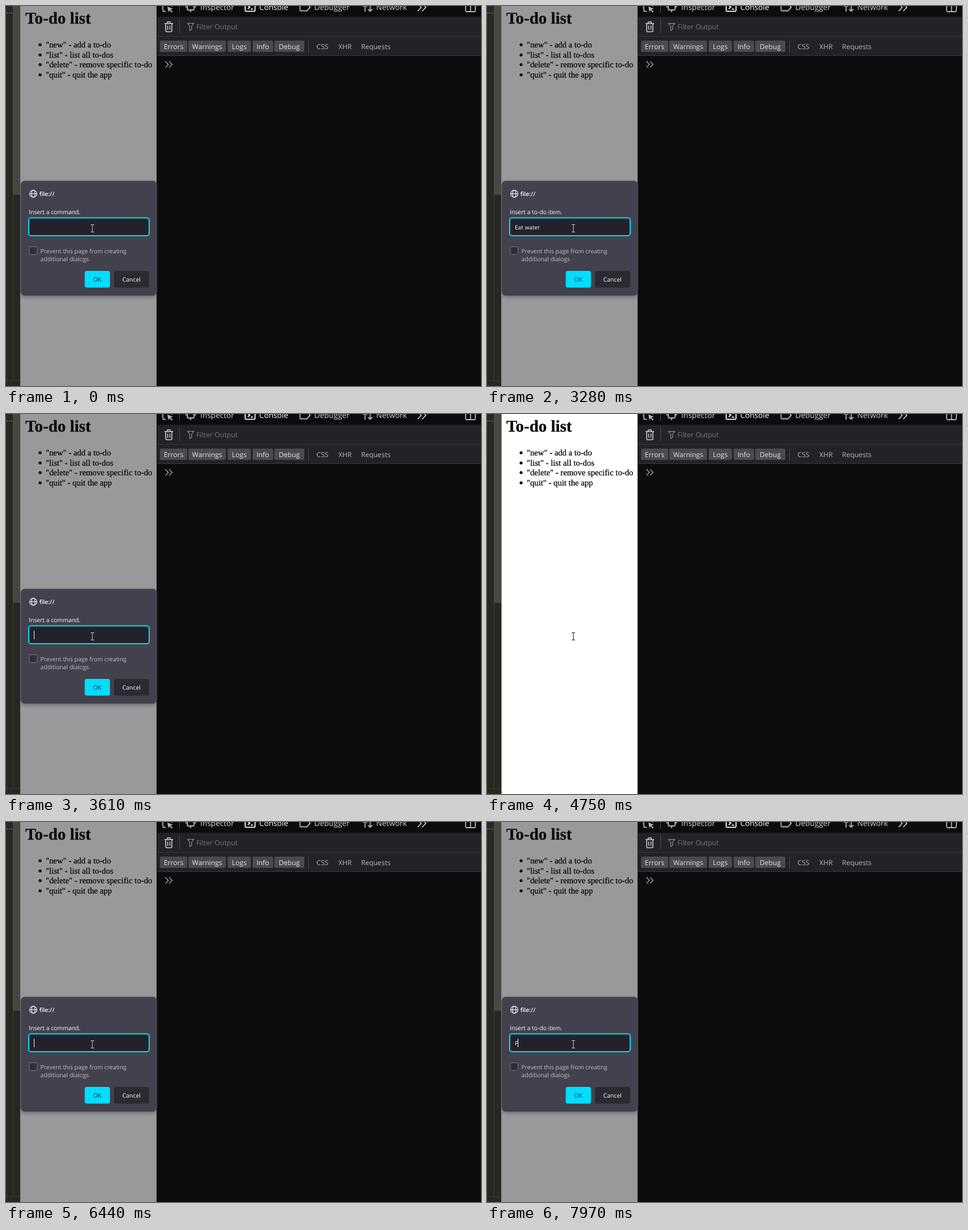
Recreate the animation shown at these times as an HTML page. Size 836 by 670 pixels, loop 8000 ms.

```html
<!DOCTYPE html>
<html lang="en">
<head>
<meta charset="utf-8">
<title>To-do list</title>
<style>
  html, body { margin: 0; width: 100%; height: 100%; overflow: hidden; background: #0c0c0d; }
  svg { display: block; width: 100vw; height: 100vh; }
  text { text-rendering: geometricPrecision; white-space: pre; }
  .ui { font-family: "Open Sans", "Noto Sans", sans-serif; font-size: 12.1px; fill: #b8b8bc; }
  .tabs { font-size: 13.6px; fill: #d0d0d3; }
  .page { font-family: "Liberation Serif", "Times New Roman", serif; font-size: 14.7px; fill: #000; }
  .page text { stroke: #000; stroke-width: .25; }
  .page .title { font-size: 28.9px; font-weight: 700; }
  .dialog { font-size: 10.4px; fill: #fbfbfe; }
  .mid { text-anchor: middle; }
  .line { fill: none; stroke: #b4b4b8; stroke-width: 1.5; }
  .bold { stroke-width: 1.8; }
  .hide { display: none; }
</style>
</head>
<body>
<svg viewBox="0 0 836 670">
  <!-- editor strip -->
  <rect width="26" height="670" fill="#272822"/>
  <rect x="12" width="13" height="333" fill="#474843"/>
  <rect x="12" y="333" width="1" height="327" fill="#3e3f38"/>
  <rect y="660" width="25" height="1" fill="#3c3d36"/>
  <path d="M0 12.5H4M5 12.5H7M8 12.5H11" stroke="#8a7d45"/>
  <rect x="25" width="1" height="670" fill="#8c8c8a"/>

  <!-- page -->
  <rect id="paper" x="26" width="239" height="670" fill="#fff"/>
  <g class="page" id="page">
    <text class="title" x="34" y="31">To-do list</text>
  </g>

  <!-- developer tools -->
  <rect x="265" width="571" height="670" fill="#0c0c0d"/>
  <rect x="266" y="19" width="570" height="68" fill="#232327"/>
  <path d="M266 53.5H836M266 87.5H836" stroke="#38383d"/>
  <path d="M305.5 0V12M305.5 24V48M532.5 60V83" stroke="#4a4a4f"/>
  <g class="ui tabs">
    <text x="342" y="7.4">Inspector</text>
    <text x="445.7" y="7.4" fill="#fff">Console</text>
    <text x="542.5" y="7.4">Debugger</text>
    <text x="651.5" y="7.4">Network</text>
  </g>
  <g class="line bold">
    <path d="M276 0V7.5Q276 9.5 278 9.5H281M292 0V1"/>
    <path d="M284 1L293.5 4.5L289.5 6L293.5 10.2L291.5 11.5L288 7.5L285.7 10.5Z" fill="#b4b4b8" stroke="none"/>
    <path d="M319 0V5.5Q319 7 320.5 7H329.5Q331 7 331 5.5V0M325 7V11M315.5 1.5H319M331 1.5H334.5"/>
    <path d="M421 0V7.5Q421 9.3 423 9.3H436.5Q438.3 9.3 438.3 7.5V0M425.5 -1L429 2L425.5 5M431 5.5H434.5" stroke="#fff"/>
    <path d="M517.5 0V6.5Q517.5 8.5 519.5 8.5H529.5L535.3 2.5L533 0"/>
    <path d="M632 10V-2M628.5 1L632 -2.5L635.5 1M641 -2V9.5M637.3 5.5L641 9.3L644.7 5.5"/>
    <path d="M724.5 -4L731 2.5L724.5 9M732.5 -4L739 2.5L732.5 9"/>
    <path d="M809 0V8.5Q809 10 810.5 10H824.5Q826 10 826 8.5V0M817.5 0V10"/>
    <path d="M279 31H294M283.5 30.5V29.5Q283.5 28 285 28H288Q289.5 28 289.5 29.5V30.5M281 31.5V43Q281 45.3 283 45.3H290Q292 45.3 292 43V31.5M284.5 34.5V42M288.5 34.5V42"/>
  </g>
  <g class="line">
    <path d="M319.5 30.7H330.5L326.6 36V41.5L323.4 43.5V36Z" stroke="#8b8b90" stroke-width="1.2"/>
    <path d="M280.5 97.5L285.8 103L280.5 108.5M287 97.5L292.3 103L287 108.5" stroke="#a0a0a4"/>
  </g>
  <g class="ui" id="filters">
    <text x="335" y="41.2" fill="#77777c" font-size="12.3">Filter Output</text>
    <text x="546.5" y="76">CSS</text>
    <text x="585" y="76">XHR</text>
    <text x="625" y="76">Requests</text>
  </g>

  <!-- prompt -->
  <g id="dialog" class="ui dialog">
    <defs>
      <filter id="blur" x="-20%" y="-20%" width="140%" height="140%"><feGaussianBlur stdDeviation="3"/></filter>
      <clipPath id="clip"><rect x="26" width="239" height="670"/></clipPath>
    </defs>
    <g clip-path="url(#clip)">
      <rect x="26" y="311" width="240" height="202" rx="7" opacity=".3" fill="#000" filter="url(#blur)"/>
    </g>
    <rect x="26" y="308.5" width="239.5" height="202" rx="7" fill="#42414d" stroke="#53525e" stroke-width=".8"/>
    <g fill="none" stroke="#fbfbfe" stroke-width="1.1">
      <circle cx="48" cy="331" r="6.3"/>
      <ellipse cx="48" cy="331" rx="2.9" ry="6.3"/>
      <path d="M41.7 331H54.3"/>
    </g>
    <text x="58.7" y="335" font-weight="600">file://</text>
    <text id="label" x="40" y="367"></text>
    <rect x="40" y="373.5" width="212" height="31.5" rx="4" fill="#23222b" stroke="#00ddff" stroke-width="2"/>
    <text id="typed" x="49" y="393.6" font-size="10.1"></text>
    <rect id="caret" y="382" width="1" height="15" fill="#fbfbfe"/>
    <rect x="41" y="424.5" width="13.5" height="13.5" rx="2" fill="#2f2e38" stroke="#777681"/>
    <g fill="#bebdc6">
      <text x="60.5" y="435.5">Prevent this page from creating</text>
      <text x="60.5" y="450">additional dialogs</text>
    </g>
    <rect x="138.5" y="467" width="44.5" height="29.5" rx="4" fill="#00ddff"/>
    <text class="mid" x="160.7" y="486.3" fill="#2b2a33">OK</text>
    <rect x="190" y="467" width="62" height="29.5" rx="4" fill="#2b2a33"/>
    <text class="mid" x="220.8" y="486.3">Cancel</text>
  </g>

  <path id="pointer" d="M149 385.5H151.3L152 386.2L152.7 385.5H155M152 386V398M149 398.5H151.3L152 397.8L152.7 398.5H155" fill="none" stroke-width="1.1"/>
</svg>
<script>
const $ = id => document.getElementById(id);

function add(parent, tag, attrs, text = "") {
  const el = document.createElementNS("http://www.w3.org/2000/svg", tag);
  for (const key in attrs) el.setAttribute(key, attrs[key]);
  el.textContent = text;
  parent.append(el);
}

['"new" - add a to-do', '"list" - list all to-dos',
 '"delete" - remove specific to-do', '"quit" - quit the app'].forEach((item, i) => {
  const y = 73 + Math.round(i * 17.7);
  add($("page"), "circle", { cx: 60, cy: y - 4.7, r: 2.6 });
  add($("page"), "text", { x: 70, y }, item);
});

[["Errors", 271, 48], ["Warnings", 321, 66], ["Logs", 390, 41],
 ["Info", 434, 36], ["Debug", 472, 53]].forEach(([name, x, width]) => {
  add($("filters"), "rect", { x, y: 61, width, height: 20, rx: 2, fill: "#4a4a4f" });
  add($("filters"), "text", { class: "mid", x: x + width / 2, y: 76, fill: "#e6e6e8" }, name);
});

// Timeline: each step is [time, prompt, text, caret]
const COMMAND = "Insert a command.", ITEM = "Insert a to-do item.";
const LOOP = 8000;
const steps = [];
const show = (time, prompt, text = "", caret = true) => steps.push([time, prompt, text, caret]);
const type = (times, prompt, text) =>
  times.forEach((time, i) => show(time, prompt, text.slice(0, i + 1)));
const every = (start, count, gap = 70) => Array.from({ length: count }, (_, i) => start + i * gap);

show(0, COMMAND, "", false);
type(every(130, 3), COMMAND, "new");
show(420, COMMAND, "new", false);
show(620, ITEM);
show(1150, ITEM, "", false);
show(1680, ITEM);
type([2140, 2280, 2480, 2550, 2680, 2750, 2880, 2950, 3080], ITEM, "Eat water");
show(3280, ITEM, "Eat water", false);
show(3540, null);
show(3610, COMMAND);
show(4140, COMMAND, "", false);
type(every(4470, 3), COMMAND, "new");
show(4680, COMMAND, "new", false);
show(4750, null);
show(4820, ITEM);
type([5020, ...every(5220, 8)], ITEM, "Drink air");
show(5910, ITEM, "Drink air", false);
show(6440, COMMAND);
show(6970, COMMAND, "", false);
type(every(7430, 3), COMMAND, "new");
show(7640, null);
show(7710, ITEM);
show(7970, ITEM, "F");

let current;
function draw(now) {
  const time = now % LOOP;
  const step = steps.findLast(s => s[0] <= time);
  if (step !== current) {
    current = step;
    const [, prompt, text, caret] = step;
    $("dialog").classList.toggle("hide", !prompt);
    $("paper").setAttribute("fill", prompt ? "#99999b" : "#fff");
    $("page").style.fill = prompt ? "#09090b" : "#000";
    $("pointer").setAttribute("stroke", prompt ? "#c4c4c8" : "#222");
    if (prompt) {
      $("label").textContent = prompt;
      $("typed").textContent = text;
      const width = text ? $("typed").getComputedTextLength() : 0;
      $("caret").setAttribute("x", Math.round(49 + width));
      $("caret").classList.toggle("hide", !caret);
    }
  }
  requestAnimationFrame(draw);
}
draw(performance.now());
</script>
</body>
</html>
```
